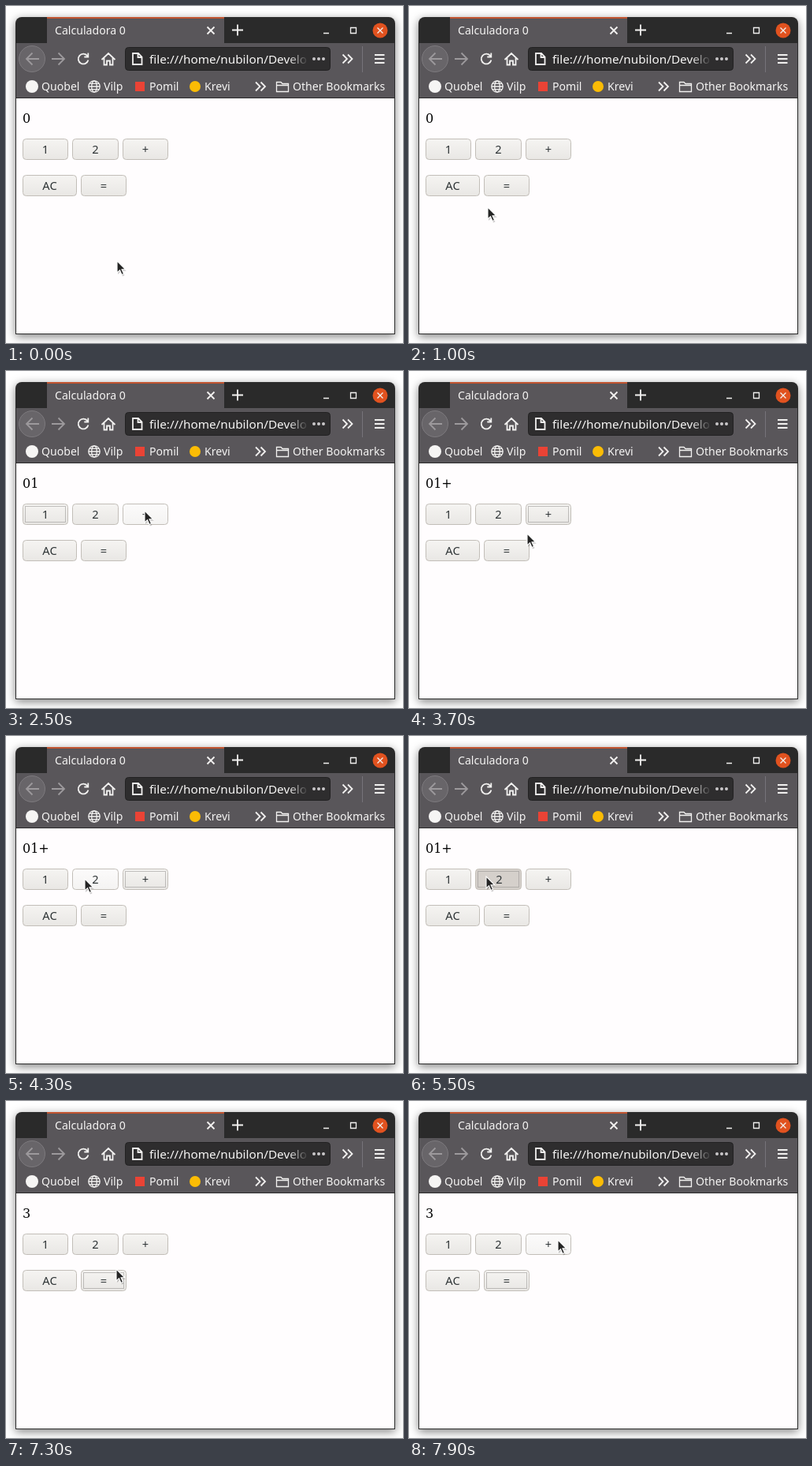
Animation, 504 px wide and 427 px high, one loop 8 s. Source, as an HTML page:

```html
<!DOCTYPE html>
<html lang="es">
<head>
<meta charset="utf-8">
<title>Calculadora 0</title>
<style>
  html, body { margin: 0; width: 100%; height: 100%; overflow: hidden; background: #fff; }
  svg { display: block; width: 504px; height: 427px; }
  text { font: 14.1px "Noto Sans", sans-serif; fill: #f6f5f4; white-space: pre; }
  .icon { fill: none; stroke: #f2f1f0; stroke-width: 1.8; }
  .dim { stroke: #9c999c; }
  .thin { stroke-width: 1.3; }
  #display { font: 16px "DejaVu Serif", serif; fill: #000; }
  .button text { font-size: 14.6px; fill: #2e3436; text-anchor: middle; }
  .face { fill: url(#idle); stroke: #c2beb8; }
  .hover .face { fill: url(#lit); }
  .pressed .face { fill: #d5d0cb; stroke: #c4bfb8; }
  .pressed text { transform: translateX(1px); }
  .ring { fill: none; stroke: #8b8987; stroke-dasharray: 1 1; visibility: hidden; }
  .focus .ring { visibility: visible; }
</style>
</head>
<body>
<svg viewBox="0 0 504 427">
  <defs>
    <linearGradient id="idle" x2="0" y2="1"><stop stop-color="#f5f4f2"/><stop offset="1" stop-color="#e9e7e4"/></linearGradient>
    <linearGradient id="lit" x2="0" y2="1"><stop stop-color="#fcfbfb"/><stop offset="1" stop-color="#f4f3f2"/></linearGradient>
    <linearGradient id="fade" gradientUnits="userSpaceOnUse" x1="358" x2="384">
      <stop stop-color="#f6f5f4"/><stop offset="1" stop-color="#f6f5f4" stop-opacity="0"/>
    </linearGradient>
    <filter id="shadow" x="-10%" y="-10%" width="120%" height="120%">
      <feDropShadow dx="0" dy="3" stdDeviation="6" flood-opacity=".5"/>
    </filter>
  </defs>

  <!-- Window frame -->
  <path d="M12 416V22a8 8 0 0 1 8-8H486a8 8 0 0 1 8 8V416Z" fill="#2b2a2a" filter="url(#shadow)"/>
  <rect x="13" y="47" width="480" height="69" fill="#59565a"/>
  <rect x="52" y="14" width="225" height="34" fill="#59565a"/>
  <rect x="52" y="14" width="225" height="2" fill="#c0532f"/>
  <rect x="13" y="117" width="480" height="298" fill="#fffdfe"/>

  <!-- Title bar -->
  <text x="62" y="36">Calculadora 0</text>
  <path class="icon" d="M255.5 26.5l9 9m0-9l-9 9"/>
  <path class="icon" d="M287 30.5h14m-7-7v14"/>
  <path class="icon thin" d="M403 34.5h7M437.5 27.5h7v7h-7z"/>
  <circle cx="475" cy="31" r="9.5" fill="#e1521f"/>
  <path class="icon thin" d="M471.5 27.5l7 7m0-7l-7 7"/>

  <!-- Toolbar -->
  <circle cx="33" cy="67" r="16.5" fill="#686569" stroke="#7d7a7e"/>
  <path class="icon dim" d="M42 67H26m7.5-7.5L26 67l7.5 7.5M58 67h16m-7.5-7.5L74 67l-7.5 7.5"/>
  <path class="icon" d="M103.4 63.3a6.4 6.4 0 1 0 1 5.2M104.3 59.5v5h-5"/>
  <path class="icon" d="M121.5 68l8.500-8 8.500 8M124.500 66v8.500h3.500v-5h4v5h3.500V66"/>
  <rect x="151.500" y="52.500" width="260" height="29" rx="4" fill="#2e2d2e" stroke="#222122"/>
  <path class="icon" d="M161 60h7l4.500 4.500V74H161zM167.500 60v5h5"/>
  <text x="182" y="73" style="font-size:15.3px;fill:url(#fade)">file:///home/nubilon/Develo</text>
  <g fill="#c9c7c9"><circle cx="391" cy="67" r="2"/><circle cx="397" cy="67" r="2"/><circle cx="403" cy="67" r="2"/></g>
  <path class="icon" d="M427.500 61.500l5.500 5.500-5.500 5.500m6.500-11l5.500 5.500-5.500 5.500"/>
  <path d="M452.500 51v33" stroke="#77747a"/>
  <path class="icon" d="M468 62h12.500m-12.500 5h12.500m-12.500 5h12.500"/>

  <!-- Bookmarks -->
  <circle cx="33" cy="102" r="8" fill="#f6f5f4"/>
  <text x="45" y="107">Quobel</text>
  <g class="icon thin">
    <circle cx="112" cy="102" r="7.200"/><ellipse cx="112" cy="102" rx="3.300" ry="7.200"/>
    <path d="M105 102h14M106 98.300h12M106 105.700h12"/>
  </g>
  <text x="124" y="107">Vilp</text>
  <rect x="164" y="96" width="12" height="12" fill="#ea4335"/>
  <text x="182" y="107">Pomil</text>
  <circle cx="240" cy="102" r="7" fill="#fbbc05"/>
  <text x="252" y="107">Krevi</text>
  <path class="icon" d="M317 96.500l5.500 5.500-5.500 5.500m6.500-11l5.500 5.500-5.500 5.500"/>
  <path class="icon thin" d="M343.500 108.500V96.500h5.500l2 2h7.500v10zM343.500 100.500h15"/>
  <text x="364" y="107">Other Bookmarks</text>

  <!-- Page -->
  <text id="display" x="21" y="148">0</text>
  <g id="buttons"></g>
  <g id="cursor">
    <path d="M1 2v15l3.500-3.300 2.500 5.800 2.500-1.200-2.500-5.500h4.700z" fill="#000" opacity=".2"/>
    <path d="M0 0v15l3.500-3.300 2.500 5.800 2.500-1.200-2.500-5.500h4.700z" fill="#242424" stroke="#fff" stroke-width="1.100"/>
  </g>
</svg>
<script>
const LOOP = 8000, STEP = 100;

const buttons = [
  { label: '1', x: 21, y: 168, w: 58 },
  { label: '2', x: 84, y: 168, w: 59 },
  { label: '+', x: 148, y: 168, w: 58 },
  { label: 'AC', x: 21, y: 214, w: 69 },
  { label: '=', x: 95, y: 214, w: 58 },
];
const BUTTON_HEIGHT = 27;

// Each click: press time, release time, button, text shown after release
const clicks = [
  [1600, 1700, '1', '01'],
  [2800, 2900, '+', '01+'],
  [5500, 5600, '2', '01+2'],
  [6400, 6700, '=', '3'],
];

// Pointer waypoints: time, x, y
const path = [
  [700, 141, 323], [800, 134, 313], [1200, 66, 197], [1300, 57, 184],
  [1400, 57, 184], [1500, 57, 173],
  [2100, 57, 173], [2200, 76, 184], [2300, 115, 191], [2400, 155, 188], [2500, 176, 177],
  [3400, 176, 177], [3500, 170, 184], [3700, 150, 206], [3900, 130, 213],
  [4100, 110, 203], [4300, 100, 181], [4400, 98, 178],
  [5800, 98, 178], [5900, 104, 187], [6000, 104, 187], [6100, 118, 216], [6200, 126, 221],
  [7200, 126, 221], [7300, 140, 213], [7500, 180, 194], [7600, 189, 190],
  [7700, 189, 190], [7900, 189, 176],
];

const byId = id => document.getElementById(id);
const display = byId('display'), cursor = byId('cursor');

byId('buttons').innerHTML = buttons.map(({ label, x, y, w }) => `
  <g class="button">
    <rect class="face" x="${x + .5}" y="${y + .5}" width="${w - 1}" height="${BUTTON_HEIGHT - 1}" rx="4"/>
    <rect class="ring" x="${x + 3.5}" y="${y + 3.5}" width="${w - 7}" height="${BUTTON_HEIGHT - 7}"/>
    <text x="${x + w / 2}" y="${y + 19}">${label}</text>
  </g>`).join('');
const groups = [...byId('buttons').children];

function pointerAt(t) {
  const next = path.findIndex(p => p[0] > t);
  if (next === 0) return path[0].slice(1);
  if (next < 0) return path[path.length - 1].slice(1);
  const [t0, x0, y0] = path[next - 1], [t1, x1, y1] = path[next];
  const k = (t - t0) / (t1 - t0);
  return [Math.round(x0 + (x1 - x0) * k), Math.round(y0 + (y1 - y0) * k)];
}

function render(t) {
  const [px, py] = pointerAt(t);
  const pressed = clicks.find(([down, up]) => t >= down && t < up)?.[2];
  const focused = clicks.filter(([down]) => t >= down).pop()?.[2];

  display.textContent = clicks.filter(([, up]) => t >= up).pop()?.[3] ?? '0';
  cursor.setAttribute('transform', `translate(${px} ${py})`);
  buttons.forEach(({ label, x, y, w }, i) => {
    const list = groups[i].classList;
    list.toggle('hover', px >= x && px < x + w && py >= y && py < y + BUTTON_HEIGHT);
    list.toggle('pressed', label === pressed);
    list.toggle('focus', label === focused);
  });
}

const start = performance.now();
function tick() {
  const t = (performance.now() - start) % LOOP;
  render(Math.floor(t / STEP) * STEP);
  requestAnimationFrame(tick);
}
tick();
</script>
</body>
</html>
```
